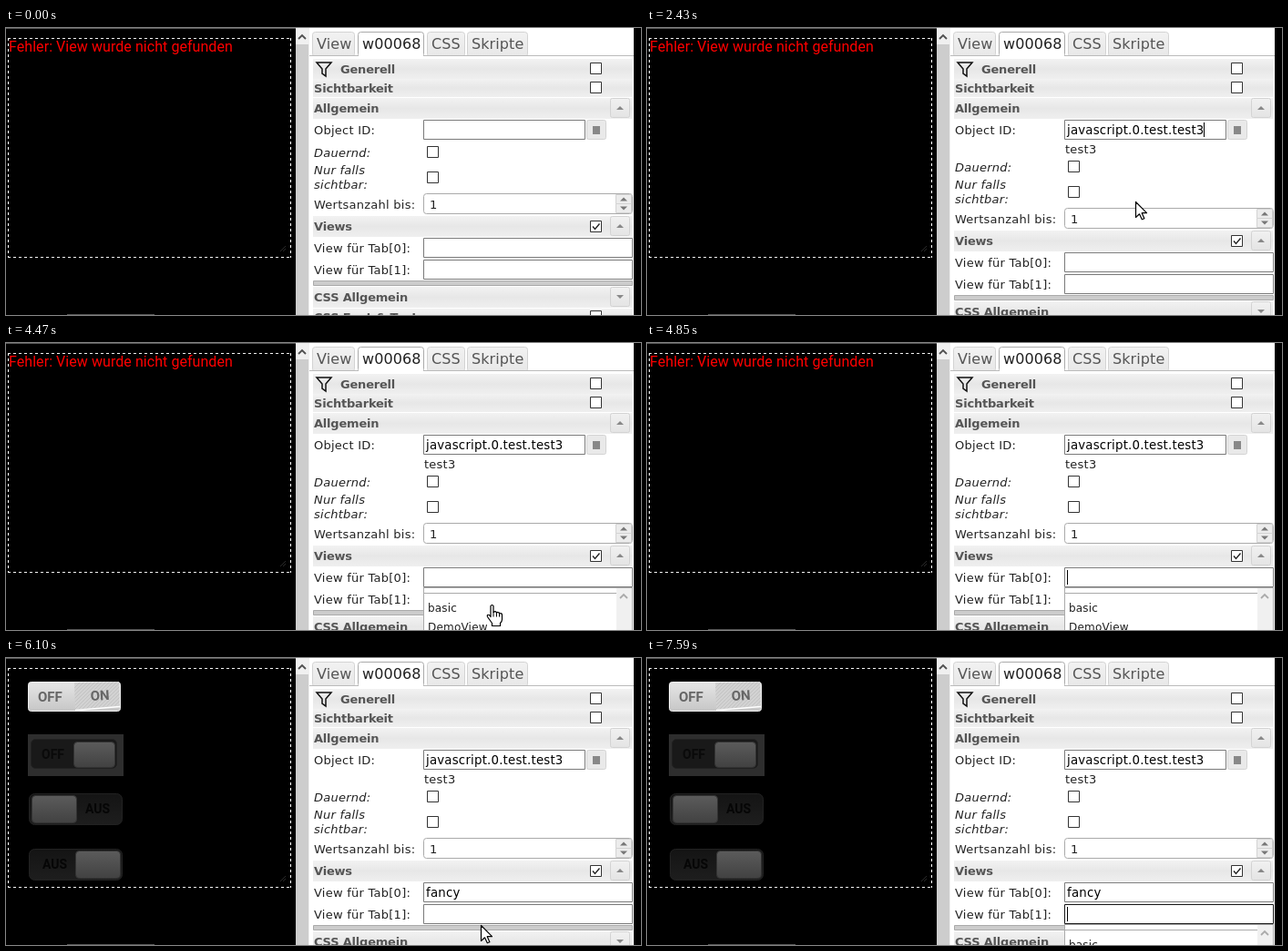
An HTML page with a canvas for the animation above (8000 ms loop, 697 px wide and 316 px high).

```html
<!DOCTYPE html>
<html lang="de">
<head>
<meta charset="utf-8">
<title>View in Tabs</title>
<style>
html, body { margin: 0; height: 100%; overflow: hidden; background: #000; }
canvas { display: block; }
</style>
</head>
<body>
<canvas id="stage" width="697" height="316"></canvas>
<script>
const ctx = document.getElementById('stage').getContext('2d');
const LOOP = 8000;
const UI = '"DejaVu Sans", sans-serif';
const ROBOTO = 'Roboto, sans-serif';

// Pointer travel: start, end, number of steps, from, to
const MOVES = [
  [210, 520, 5, [572, 290], [536, 123]],
  [670, 750, 2, [536, 123], [536, 118]],
  [1910, 2600, 10, [536, 118], [536, 222]],
  [2850, 3150, 5, [536, 222], [530, 252]],
  [4080, 4470, 6, [530, 252], [533, 288]],
  [4545, 4620, 2, [533, 288], [531, 330]],
  [6100, 6470, 6, [520, 296], [525, 282]],
];

// Text carets: from, until, x, top
const CARETS = [
  [980, 1510, 461, 104],
  [1740, 2450, 611, 104],
  [2850, 3000, 611, 104],
  [3320, 4150, 461, 250],
  [4620, 5180, 461, 250],
  [5550, 6100, 498, 250],
  [6650, 7110, 461, 274],
  [7590, 8000, 461, 274],
];

const SHAPES = {
  arrow: new Path2D('M0 0V17L4 13.3L6.8 19.3L9.4 18.2L6.7 12.2H12Z'),
  hand: new Path2D('M-1.5 1Q0-1 1.5 1V8Q4 6 5 8.5Q7 7 8 9.5Q11 8.5 11 11V16Q11 18 9 20V23H0V20L-5 13Q-6 10-3 11L-1.5 13Z'),
};

const between = (t, from, to) => t >= from && t < to;

function rect(x, y, w, h, fill) {
  ctx.fillStyle = fill;
  ctx.fillRect(x, y, w, h);
}

function box(x, y, w, h, fill, stroke, radius = 0) {
  ctx.beginPath();
  ctx.roundRect(x + .5, y + .5, w - 1, h - 1, radius);
  ctx.fillStyle = fill;
  ctx.fill();
  if (!stroke) return;
  ctx.lineWidth = 1;
  ctx.strokeStyle = stroke;
  ctx.stroke();
}

function line(points, color, width = 1) {
  ctx.beginPath();
  points.forEach(([x, y]) => ctx.lineTo(x, y));
  ctx.lineWidth = width;
  ctx.strokeStyle = color;
  ctx.stroke();
}

function polygon(points, fill) {
  ctx.beginPath();
  points.forEach(([x, y]) => ctx.lineTo(x, y));
  ctx.closePath();
  ctx.fillStyle = fill;
  ctx.fill();
}

function vertical(y, h, ...colors) {
  const g = ctx.createLinearGradient(0, y, 0, y + h);
  colors.forEach((c, i) => g.addColorStop(i / (colors.length - 1), c));
  return g;
}

function text(str, x, y, color = '#222', font = '13px ' + UI, spacing = .25) {
  ctx.font = font;
  ctx.letterSpacing = spacing + 'px';
  ctx.fillStyle = color;
  ctx.fillText(str, x, y);
}

const italic = (str, x, y) => text(str, x, y, '#222', 'italic 13px ' + UI);
const bold = (str, x, y) => text(str, x, y, '#555', 'bold 13px ' + UI, -.2);
const value = (str, x, y) => text(str, x, y, '#000', '13.33px ' + UI, .2);
const option = (str, x, y) => text(str, x, y, '#212121', '12px ' + UI, .2);

function triangle(x, y, dir, size = 4, color = '#888') {
  const h = size / 2 * dir;
  polygon([[x - size, y + h], [x + size, y + h], [x, y - h]], color);
}

const chevron = (x, y, color) => line([[x - 4, y + 2], [x, y - 2], [x + 4, y + 2]], color, 1.8);

function header(label, y, h, x = 338, baseline = y + h / 2 + 4) {
  rect(337, y, 351, h, vertical(y, h, '#f2f2f2', '#e7e7e7', '#efefef'));
  bold(label, x, baseline);
}

function toggle(y, dir) {
  box(663, y, 22, 22, vertical(y, 22, '#f1f1f1', '#e4e4e4'), '#d3d3d3', 2);
  triangle(674, y + 11, dir);
}

function checkbox(x, y, checked) {
  box(x, y, 13, 13, '#fff', '#333');
  if (checked) line([[x + 3, y + 6.5], [x + 5.5, y + 9.5], [x + 10.5, y + 3.5]], '#222', 1.4);
}

function input(y, w, pointer) {
  const hover = pointer && pointer[0] >= 458 && pointer[0] < 458 + w
    && pointer[1] >= y && pointer[1] < y + 22;
  box(458, y, w, 22, '#fff', hover ? '#171717' : '#7a7a7a');
  return hover;
}

function tab(label, x, w, active) {
  box(x, 4, w, 28, active ? '#fff' : vertical(4, 26, '#f2f2f2', '#e8e8e8'), active ? '#aaa' : '#d3d3d3', 3);
  if (active) rect(x + 1, 29, w - 2, 5, '#fff');
  else {
    rect(x, 30, w, 3, '#fff');
    rect(x, 30, w, 1, '#bbb');
  }
  text(label, x + 5, 23, active ? '#212121' : '#555', '16px ' + UI, .1);
}

function knob(x, y, w, h) {
  box(x, y, w, h, vertical(y, h, '#5c5c5c', '#414141'), '#333', 4);
}

function darkSwitch(y, knobX, labelX) {
  box(25, y, 103, 35, vertical(y, 35, '#141414', '#1e1e1e'), '#222', 6);
  text('AUS', labelX, y + 22, '#060606', 'bold 14px ' + ROBOTO, 0);
  knob(knobX, y + 2, 50, 31);
}

function switches() {
  box(24, 26, 102, 33, vertical(26, 33, '#e6e6e6', '#c6c6c6'), '#eee', 3);
  polygon([[75, 27], [124, 26], [125, 52], [76, 57]], '#d2d2d2');
  ctx.save();
  ctx.clip();
  for (let x = 50; x < 130; x += 4) line([[x, 58], [x + 32, 26]], '#c2c2c2');
  ctx.restore();
  line([[76, 57.5], [125, 53.5]], '#fff', 1.5);
  text('OFF', 35, 48, '#666', 'bold 15px ' + ROBOTO, 0);
  ctx.save();
  ctx.translate(93, 47);
  ctx.rotate(-.06);
  text('ON', 0, 0, '#666', 'bold 15px ' + ROBOTO, 0);
  ctx.restore();

  rect(24, 84, 105, 46, '#2e2e2e');
  box(27, 89, 95, 33, '#191919', '#222', 5);
  text('OFF', 39, 111, '#0a0a0a', 'bold 14px ' + ROBOTO, 0);
  knob(74, 92, 46, 29);

  darkSwitch(149, 28, 87);
  darkSwitch(210, 76, 40);
}

function preview(t) {
  rect(0, 0, 318, 1, '#555');
  ctx.setLineDash([3, 3]);
  for (const y of [11.5, 252.5]) line([[2, y], [313, y]], '#fff');
  for (const x of [2.5, 312.5]) line([[x, 11], [x, 253]], '#fff');
  ctx.setLineDash([]);
  for (const d of [3, 6]) line([[307 - d, 246], [307, 246 - d]], '#2a2a2a');
  rect(67, 315, 96, 1, '#555');
  if (t < 5550) text('Fehler: View wurde nicht gefunden', 3, 26, '#f00', '16px ' + ROBOTO, .06);
  if (t >= 5625) switches();
  rect(318, 0, 15, 316, '#f0f0f0');
  rect(318, 18, 14, 298, '#cdcdcd');
  chevron(325, 10, '#505050');
}

function dropdown(y) {
  rect(458, y, 230, 316 - y, '#fff');
  rect(458, y, 230, 1, '#aaa');
  rect(458, y, 1, 316 - y, '#aaa');
  rect(458, y + 6, 212, 1, '#aaa');
  rect(670, y + 1, 17, 315 - y, '#f0f0f0');
  rect(687, y, 1, 316 - y, '#aaa');
  chevron(678, y + 10, '#aaa');
  option('basic', 463, y + 27);
  option('DemoView', 463, y + 48);
}

function panel(t, pointer) {
  rect(333, 0, 356, 316, '#fff');
  rect(333, 30, 356, 1, '#bbb');
  tab('View', 336, 47);
  tab('w00068', 386, 73, true);
  tab('CSS', 462, 42);
  tab('Skripte', 506, 67);

  header('Generell', 34, 22, 367, 50);
  line([[341, 38], [357, 38], [351, 45], [351, 53], [347, 50], [347, 45], [341, 38], [357, 38]], '#111', 1.5);
  checkbox(641, 38);
  header('Sichtbarkeit', 56, 20, 338, 71);
  checkbox(641, 59);
  header('Allgemein', 77, 23);
  toggle(77, 1);

  text('Object ID:', 338, 117);
  let overInput = input(101, 178, pointer);
  box(637, 101, 22, 22, '#e9e9e9', '#d3d3d3', 2);
  rect(644, 108, 8, 9, '#888');
  if (t >= 1740) value('javascript.0.test.test3', 461, 117);

  const shift = t >= 2060 ? 16 : 0;
  if (shift) text('test3', 459, 138);

  ctx.save();
  ctx.translate(0, shift);
  const local = pointer && [pointer[0], pointer[1] - shift];
  italic('Dauernd:', 338, 142);
  checkbox(462, 130);
  italic('Nur falls', 338, 161);
  italic('sichtbar:', 338, 177);
  checkbox(462, 158);
  text('Wertsanzahl bis:', 338, 199);
  box(458, 182, 230, 23, '#fff', '#aaa', 3);
  box(669, 183, 18, 11, '#ececec', '#d3d3d3');
  box(669, 193, 18, 11, '#ececec', '#d3d3d3');
  triangle(678, 188.5, 1, 4, '#777');
  triangle(678, 198.5, -1, 4, '#777');
  text('1', 465, 199);

  header('Views', 207, 23);
  checkbox(641, 212, true);
  toggle(207, 1);
  for (const i of [0, 1]) {
    text(`View für Tab[${i}]:`, 338, 247 + 24 * i);
    overInput = input(231 + 24 * i, 230, local) || overInput;
  }
  if (t >= 5550) value('fancy', 461, 247);

  box(337, 278, 351, 6, '#ccc', '#aaa');
  header('CSS Allgemein', 285, 23);
  toggle(285, -1);
  header('CSS Font & Text', 309, 20);
  checkbox(641, 311);
  ctx.restore();

  if (between(t, 3470, 5550)) dropdown(269);
  if (t >= 6960) dropdown(293);
  for (const [from, to, x, y] of CARETS) {
    if (between(t, from, to)) rect(x, y, 1, 16, '#000');
  }
  return overInput;
}

function pointerAt(t) {
  const move = MOVES.findLast(m => t >= m[0]);
  if (!move) return null;
  const [start, end, steps, from, to] = move;
  const step = Math.min(steps, 1 + Math.floor((t - start) / (end - start) * (steps - 1) + 1e-6));
  return from.map((v, i) => Math.round(v + (to[i] - v) * step / steps));
}

function drawBeam(x, y) {
  line([[x + .5, y - 7], [x + .5, y + 8]], '#000');
  for (const edge of [y - 7.5, y + 7.5]) {
    line([[x - 3, edge], [x, edge]], '#000');
    line([[x + 1, edge], [x + 4, edge]], '#000');
  }
}

function drawShape(name, x, y) {
  ctx.save();
  ctx.translate(x + .5, y + .5);
  ctx.lineJoin = 'round';
  ctx.lineWidth = 1.2;
  ctx.fillStyle = '#fff';
  ctx.strokeStyle = '#000';
  ctx.fill(SHAPES[name]);
  ctx.stroke(SHAPES[name]);
  if (name === 'hand') for (const fx of [1.5, 5, 8]) line([[fx, 8], [fx, 13]], '#000');
  ctx.restore();
}

function draw(t) {
  rect(0, 0, 697, 316, '#000');
  const pointer = pointerAt(t);
  const overList = pointer && between(t, 3470, 5550) && pointer[1] >= 269;
  preview(t);
  const overInput = panel(t, overList ? null : pointer);
  if (!pointer || t >= 7110) return;
  if (overInput) drawBeam(...pointer);
  else drawShape(overList ? 'hand' : 'arrow', ...pointer);
}

const startTime = performance.now();
function tick() {
  draw((performance.now() - startTime) % LOOP);
  requestAnimationFrame(tick);
}
tick();
</script>
</body>
</html>
```
